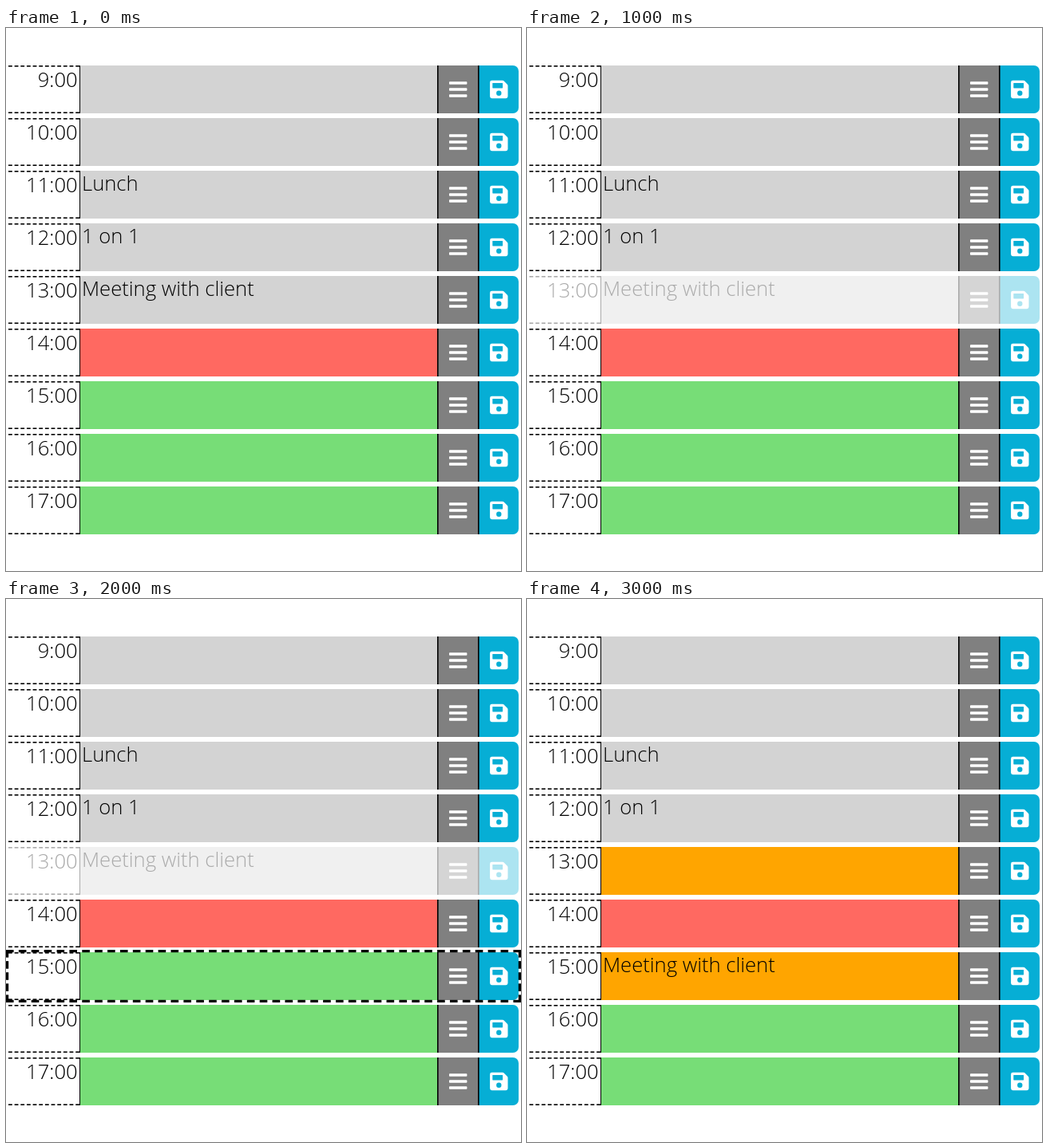
Animation, 645 px wide and 681 px high, one loop 4 s. Source, as an HTML page with a canvas:

```html
<!DOCTYPE html>
<html lang="en">
<head>
<meta charset="utf-8">
<title>Day planner</title>
<style>
  html, body { margin: 0; width: 100%; height: 100%; overflow: hidden; background: #fff; }
  canvas { display: block; }
</style>
</head>
<body>
<canvas id="stage" width="645" height="681"></canvas>
<script>
const ctx = document.getElementById('stage').getContext('2d');
const LOOP = 4000, STEP = 1000;
const TOP = 47, PITCH = 66, ROW_H = 60, FIRST_HOUR = 9, ROWS = 9;
const DRAGGED = 4, DROP = 6;
const PAST = '#d3d3d3', NOW = '#ff6961', FUTURE = '#77dd77', CHANGED = '#ffa500';
const GREY = '#808080', BLUE = '#06aed5';

function box(x, y, w, h, color) {
  ctx.fillStyle = color;
  ctx.fillRect(x, y, w, h);
}

function rounded(x, y, w, h, r, color) {
  ctx.fillStyle = color;
  ctx.beginPath();
  ctx.roundRect(x, y, w, h, r);
  ctx.fill();
}

// Dashes fill the line exactly, with a whole dash at each end
function dashed(x, y, length, width, vertical) {
  const dash = width * 3, ideal = width * 2;
  const few = Math.floor((length + ideal) / (dash + ideal));
  const gapFor = n => (length - n * dash) / (n - 1);
  const a = gapFor(few), b = gapFor(few + 1);
  const gap = b > 0 && Math.abs(b - ideal) < Math.abs(a - ideal) ? b : a;
  for (let p = 0; p < length - 1; p += dash + gap) {
    if (vertical) box(x, y + p, width, dash, '#000');
    else box(x + p, y, dash, width, '#000');
  }
}

function label(text, x, y, align) {
  ctx.font = '300 25.6px "Open Sans", sans-serif';
  ctx.textAlign = align;
  ctx.fillStyle = '#000';
  ctx.fillText(text, x, y);
}

function menuIcon(cx, cy) {
  for (const dy of [-8, 0, 8]) rounded(cx - 11.2, cy + dy - 1.8, 22.4, 3.6, 0.8, '#fff');
}

function saveIcon(cx, cy) {
  ctx.save();
  ctx.translate(cx - 11.2, cy - 11.2);
  ctx.fillStyle = '#fff';
  ctx.beginPath();
  ctx.moveTo(2.4, 0);
  ctx.lineTo(15.8, 0);
  ctx.quadraticCurveTo(16.8, 0, 17.5, 0.7);
  ctx.lineTo(21.7, 4.9);
  ctx.quadraticCurveTo(22.4, 5.6, 22.4, 6.6);
  ctx.arcTo(22.4, 22.4, 0, 22.4, 2.4);
  ctx.arcTo(0, 22.4, 0, 0, 2.4);
  ctx.arcTo(0, 0, 22.4, 0, 2.4);
  ctx.closePath();
  ctx.fill();
  rounded(3.2, 3.2, 12.8, 6.4, 0.6, BLUE);
  ctx.beginPath();
  ctx.arc(11.2, 16, 3.2, 0, Math.PI * 2);
  ctx.fill();
  ctx.restore();
}

function drawRow(i, color, note) {
  const y = TOP + i * PITCH, mid = y + ROW_H / 2;
  dashed(3, y, 89, 1.6);
  dashed(3, y + ROW_H - 1.6, 89, 1.6);
  label(`${FIRST_HOUR + i}:00`, 89.6, y + 27, 'right');
  box(93, y, 447, ROW_H, color);
  box(92, y, 1, ROW_H, '#000');
  box(540, y, 53, ROW_H, GREY);
  box(540, y, 1.6, ROW_H, '#000');
  rounded(592, y, 50, ROW_H, [0, 7, 7, 0], BLUE);
  box(591, y, 1.6, ROW_H, '#000');
  menuIcon(566.2, mid);
  saveIcon(617.3, mid);
  if (note) label(note, 95, y + 25, 'left');
}

function draw(time) {
  const phase = Math.floor((time % LOOP) / STEP);
  const dragging = phase === 1 || phase === 2, dropped = phase === 3;
  const notes = { 2: 'Lunch', 3: '1 on 1', [dropped ? DROP : DRAGGED]: 'Meeting with client' };

  box(0, 0, 645, 681, '#fff');
  for (let i = 0; i < ROWS; i++) {
    const moved = dropped && (i === DRAGGED || i === DROP);
    const color = moved ? CHANGED : i < 5 ? PAST : i === 5 ? NOW : FUTURE;
    drawRow(i, color, notes[i]);
  }
  if (dragging) box(0, TOP + DRAGGED * PITCH, 645, ROW_H, 'rgba(255,255,255,0.667)');
  if (phase === 2) {
    const y = TOP + DROP * PITCH - 3, w = 3.2;
    dashed(0, y, 645, w);
    dashed(0, y + 66 - w, 645, w);
    dashed(0, y, 66, w, true);
    dashed(645 - w, y, 66, w, true);
  }
}

let start;
function tick(now) {
  start ??= now;
  draw(Math.max(0, now - start));
  requestAnimationFrame(tick);
}
draw(0);
requestAnimationFrame(tick);
</script>
</body>
</html>
```
